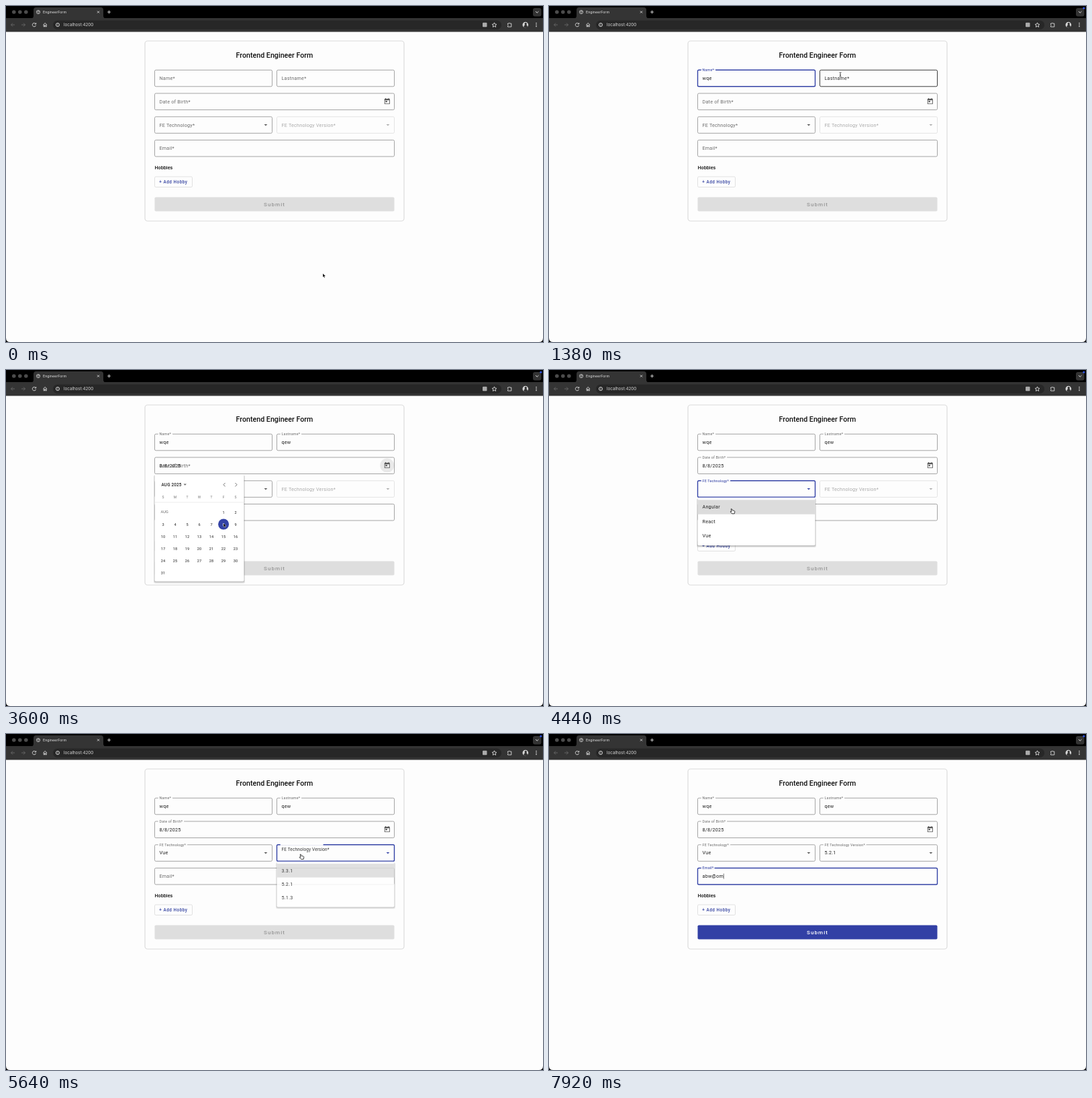
Write an HTML page that moves like this. It is 800 by 500 pixels and loops after 8000 ms.

```html
<!DOCTYPE html>
<html lang="en">
<head>
<meta charset="utf-8">
<title>Engineer form</title>
<style>
html, body { margin: 0; width: 100%; height: 100%; overflow: hidden; background: #000; }
svg { display: block; width: 800px; height: 500px; font-family: Roboto, sans-serif; }
.ui { font-family: Inter, sans-serif; }
</style>
</head>
<body>
<svg viewBox="0 0 800 500">
  <rect width="800" height="500"/>
  <g id="browser">
    <path d="M37 18.5q4 0 4-4V6q0-4 4-4h96q4 0 4 4v8.500q0 4 4 4z" fill="#343434"/>
    <rect y="18" width="800" height="21" fill="#343434"/>
    <rect x="70" y="21.500" width="668" height="13.500" rx="6.750" fill="#272727"/>
    <g fill="#4c4c4c"><circle cx="11.800" cy="9" r="2.800"/><circle cx="20.800" cy="9" r="2.800"/><circle cx="29.800" cy="9" r="2.800"/></g>
    <circle cx="48" cy="9" r="2.700" fill="none" stroke="#c8c8c8" stroke-width=".8"/>
    <path d="M46 8l2 .6-.5 1.500 1.500 1M48.500 6.600l-.3 1.400 2 .7" fill="none" stroke="#c8c8c8" stroke-width=".7"/>
    <g class="ui" fill="#e4e4e4">
      <text x="55" y="11" font-size="5.300">EngineerForm</text>
      <text x="86" y="30.300" font-size="6.250" fill="#d8d8d8">localhost:4200</text>
    </g>
    <g fill="none" stroke="#ddd" stroke-width=".9">
      <path d="M136 7.500l3 3m0-3l-3 3M151 9h5m-2.500-2.500v5"/>
      <path d="M13 28H7.500m2.500-2.500L7.500 28l2.500 2.500M23 28h5.500m-2.500-2.500l2.500 2.500-2.500 2.500" stroke="#686868"/>
      <path d="M44.300 26.600a2.700 2.700 0 1 0 .3 2.200M44.700 25v2h-2"/>
      <path d="M55.500 28l2.700-2.600 2.700 2.600M56.200 27.500v3.300h1.300v-2h1.400v2h1.300v-3.300"/>
      <circle cx="77" cy="28" r="2.600"/><path d="M77 27.500v1.800M77 26.300v.6"/>
      <path d="M727.500 24.800l1 2.200 2.400.3-1.800 1.600.5 2.400-2.100-1.200-2.100 1.200.5-2.400-1.800-1.600 2.400-.3z"/>
      <path d="M747.500 26h1.500q.8-2 1.600 0h2.200v5h-5.300v-1.600q1.500-.7 0-1.700z"/>
    </g>
    <rect x="710" y="24.800" width="6.500" height="6.500" rx="1" fill="#aaa"/>
    <circle cx="773.800" cy="28" r="4.300" fill="#d8d8d8"/>
    <path d="M771.300 31.500q0-3 2-3.500a1.700 1.700 0 1 1 1.800 0q2 .6 1.800 3.400-2.800 1.800-5.600.1z" fill="#333"/>
    <g fill="#ddd"><circle cx="790" cy="25.600" r=".8"/><circle cx="790" cy="28" r=".8"/><circle cx="790" cy="30.400" r=".8"/></g>
    <rect x="785" y="3" width="12.500" height="12.500" rx="3" fill="#333"/>
    <path d="M789 8l2.200 2.200L793.400 8" fill="none" stroke="#ddd"/>
  </g>
  <path d="M0 38.500h800V494q0 6-6 6H6q-6 0-6-6z" fill="#fdfdfd"/>
  <rect x="207" y="52" width="386" height="268" rx="4" fill="#fdfdfd" stroke="#dcdcdc" stroke-width="1.200"/>
  <text x="400" y="77" font-size="10.700" font-weight="500" text-anchor="middle" fill="#111">Frontend Engineer Form</text>
  <text x="221.500" y="242.800" font-size="7.200" font-weight="500" fill="#111">Hobbies</text>
  <rect x="221.500" y="254" width="56" height="15.500" rx="1.800" fill="none" stroke="#dedede" stroke-width=".9"/>
  <text x="228.300" y="264" font-size="6.300" font-weight="500" letter-spacing=".55" fill="#303f9f">+ Add Hobby</text>
  <g id="live"></g>
</svg>
<script>
const LOOP = 8000, STEP = 60;
const BLUE = '#3443a6', BG = '#fdfdfd';
const live = document.getElementById('live');

const clamp = v => Math.max(0, Math.min(1, v));
const ramp = (t, start, length) => clamp((t - start) / length);
const easeOut = p => 1 - (1 - p) ** 2;
const smooth = p => p * p * (3 - 2 * p);
const mix = (a, b, p) => a + (b - a) * p;
const typed = (text, times, t) => text.slice(0, times.filter(at => t >= at).length);

function label(x, y, content, { size = 7.2, fill = '#222', extra = '' } = {}) {
  return `<text x="${x}" y="${y}" font-size="${size}" letter-spacing="${size * .03125}" fill="${fill}" ${extra}>${content}</text>`;
}

// Each move: start, end, from, to. The pointer rests in between.
const moves = [
  [0, 420, 472, 400, 302, 108],
  [1020, 1380, 318, 109, 434, 102],
  [1980, 2400, 436, 108, 566.5, 139],
  [2760, 3360, 566.5, 139, 324, 230],
  [3600, 3960, 324, 230, 285, 181],
  [4200, 4440, 285, 181, 273.5, 210],
  [4440, 4740, 273.5, 210, 262, 247],
  [4920, 5400, 262, 247, 440.5, 182.5],
  [5640, 5940, 440.5, 182.5, 441, 225],
  [6180, 6480, 441, 225, 345, 212]
];
const hiddenSpans = [[780, 1020], [1680, 1980], [6720, LOOP]];

function pointerAt(t) {
  const [start, end, x0, y0, x1, y1] = moves.filter(m => t >= m[0]).pop();
  const p = smooth(ramp(t, start, end - start));
  return {
    x: mix(x0, x1, p), y: mix(y0, y1, p),
    hidden: hiddenSpans.some(([a, b]) => t >= a && t < b)
  };
}

const fields = [
  { x: 221.5, y: 95.3, w: 175, name: 'Name*', notch: 18, float: 420, focus: [420, 1560],
    text: 'wqe', keys: [780, 840, 960], caret: [540, 1020] },
  { x: 403.5, y: 95.3, w: 175, name: 'Lastname*', notch: 28, float: 1560, focus: [1560, 2640],
    text: 'qew', keys: [1680, 1740, 1860], caret: [1620, 1980] },
  { x: 221.5, y: 130, w: 357, name: 'Date of Birth*', notch: 35, float: 3600, focus: [0, 0],
    text: '8/8/2025', keys: Array(8).fill(3600) },
  { x: 221.5, y: 164.8, w: 175, name: 'FE Technology*', notch: 40, float: 4200, focus: [4200, 5580],
    text: 'Vue', keys: Array(3).fill(4920), select: true },
  { x: 403.5, y: 164.8, w: 175, name: 'FE Technology Version*', notch: 60.5, float: 5580, focus: [5580, 6660],
    text: '5.2.1', keys: Array(5).fill(6180), select: true, enabled: 4920 },
  { x: 221.5, y: 199.5, w: 357, name: 'Email*', notch: 16.5, float: 6660, focus: [6660, LOOP],
    text: 'abw@om', keys: [6780, 6840, 6960, 7380, 7800, 7920], caret: [6720, LOOP] }
];
const advance = { w: 5.6, q: 4.3, e: 4.05, a: 4.1, b: 4.25, '@': 6.7, o: 4.3, m: 6.5 };

const inside = (f, c) => c.x > f.x && c.x < f.x + f.w && c.y > f.y && c.y < f.y + 24.5;

function drawField(f, t, pointer, blocked) {
  const disabled = t < (f.enabled || 0);
  const focused = t >= f.focus[0] && t < f.focus[1];
  const tinted = t >= f.focus[0] + 100 && t < f.focus[1] + 60;
  const hover = !disabled && !blocked && !pointer.hidden && inside(f, pointer);
  const lift = ramp(t, f.float, 130);
  const border = disabled ? '#e2e2e2' : focused ? BLUE : hover ? '#333' : '#a0a0a0';
  const ink = disabled ? '#aaa' : tinted ? BLUE : hover || focused ? '#333' : '#6c6c6c';
  const middle = f.y + 12.2, left = f.x + 7;
  let out = `<rect x="${f.x}" y="${f.y}" width="${f.w}" height="24.5" rx="1.800" fill="none" stroke="${border}" stroke-width="${focused ? 1.4 : .95}"/>`;
  if (lift > 0) out += `<rect x="${left - 1.8}" y="${f.y - 1}" width="${f.notch + 3.4}" height="2" fill="${BG}"/>`;
  out += label(left, mix(middle + 2.6, f.y + 1.9, lift), f.name, { size: mix(7.2, 5.4, lift), fill: ink });

  const value = typed(f.text, f.keys, t);
  out += label(left, middle + 2.3, value);
  if (f.caret && t >= f.caret[0] && t < f.caret[1]) {
    const end = [...value].reduce((sum, ch) => sum + advance[ch], left);
    out += `<path d="M${end + .3} ${middle - 4}v8" stroke="#222" stroke-width=".6"/>`;
  }
  if (f.select) {
    out += `<path d="M${f.x + f.w - 12} ${middle - 1.1}h4.800l-2.400 2.400z" fill="${disabled ? '#aaa' : focused ? BLUE : '#555'}"/>`;
  }
  return out;
}

function drawDateButton(t) {
  const shade = t < 2340 ? 0 : t < 2640 ? .03 : t < 2880 ? .2 : t < 4200 ? .08 : 0;
  return `<circle cx="567.800" cy="142" r="10.600" opacity="${shade}"/>
    <path transform="translate(562.400 136.600) scale(.45)" fill="#555" d="M19 3h-1V1h-2v2H8V1H6v2H5c-1.100 0-2 .9-2 2v14c0 1.100.9 2 2 2h14c1.100 0 2-.9 2-2V5c0-1.100-.9-2-2-2zm0 16H5V8h14zM7 10h5v5H7z"/>`;
}

function drawSubmit(t) {
  const p = ramp(t, 7800, 120);
  const blend = (a, b) => `rgb(${a.map((v, i) => Math.round(mix(v, b[i], p)))})`;
  return `<rect x="221.500" y="284.500" width="357" height="21" rx="1.800" fill="${blend([222, 222, 222], [50, 64, 165])}"/>
    <text x="384" y="297.900" font-size="8.100" font-weight="500" letter-spacing="1.050" fill="${blend([152, 152, 152], [255, 255, 255])}">Submit</text>`;
}

// Overlay that grows from its top edge and fades away on close.
function overlay(t, open, close, x, y, w, h, content) {
  if (t <= open || t >= close + 100) return '';
  const p = easeOut(ramp(t, open, 120));
  const opacity = Math.min(1, p * 1.15) * (1 - ramp(t, close, 100));
  const shadow = [3, 2, 1].map(d =>
    `<rect x="${-d / 2}" y="${d / 2}" width="${w + d}" height="${h + d / 2}" rx="2.500" opacity=".09"/>`).join('');
  return `<g opacity="${opacity}" transform="translate(${x} ${y}) scale(1 ${mix(.8, 1, p)})">${shadow}
    <rect width="${w}" height="${h}" rx="1.800" fill="#fff"/>${content}</g>`;
}

function drawMenu(t, open, close, x, options, pointer) {
  const row = 21.4, pad = 3.5;
  const pointed = Math.floor((pointer.y - 189.8 - pad) / row);
  const active = pointed >= 0 && pointed < options.length ? pointed : 0;
  const content = `<rect y="${pad + active * row}" width="175" height="${row}" fill="#dcdcdc"/>` +
    options.map((o, i) => label(7, pad + (i + .5) * row + 2.4, o)).join('');
  return overlay(t, open, close, x, 189.8, 175, 71.2, content);
}

function drawCalendar(t, pointer) {
  const cell = 18, column = i => 3.6 + (i + .5) * cell;
  const small = { size: 5.6, extra: 'text-anchor="middle"' };
  let out = label(10, 18, 'AUG 2025', { size: 6.3, extra: 'font-weight="500"' }) +
    '<path d="M43 14.600h4.400l-2.200 2.200z" fill="#666"/>' +
    '<path d="M105 13l-2.500 2.700 2.500 2.700M120 13l2.500 2.700-2.500 2.700" fill="none" stroke="#666" stroke-width=".9"/>' +
    '<path d="M0 42h133" stroke="#e0e0e0" stroke-width=".6"/>' +
    [...'SMTWTFS'].map((d, i) => label(column(i), 36, d, { ...small, size: 5, fill: '#777' })).join('') +
    label(9, 58.2, 'AUG', { size: 5.6, fill: '#666' });
  for (let day = 1; day <= 31; day++) {
    const slot = day + 4, cx = column(slot % 7), cy = 56.5 + Math.floor(slot / 7) * cell;
    const near = Math.abs(pointer.x - 221.5 - cx) < 9 && Math.abs(pointer.y - 155 - cy) < 9;
    if (near) out += `<circle cx="${cx}" cy="${cy}" r="8" fill="${t >= 3600 ? BLUE : '#c9cdea'}"/>`;
    out += label(cx, cy + 2, day, { ...small, fill: near && t >= 3600 ? '#fff' : '#222' });
  }
  return overlay(t, 2640, 3600, 221.5, 155, 133, 159.5, out);
}

function drawPointer(c, t, overlaid) {
  if (c.hidden) return '';
  const target = fields.find(f => inside(f, c));
  const hand = overlaid || (target && (target.select || c.x > 557 && target.y === 130));
  const at = `transform="translate(${c.x} ${c.y})"`;
  if (hand) {
    return `<path ${at} d="M-2.300-3.200q.8-.9 1.400.2l.7 1.900 2.500.5q1.300.4 1 1.800l-.6 2.600h-3.600l-2.300-2.600q-.3-1.100 1-.6l.7.4z" fill="#fff" stroke="#111" stroke-width=".8"/>`;
  }
  if (target) {
    return `<path ${at} d="M-1.500-3.300q1.300 0 1.500.8.200-.8 1.500-.8M0-2.500v5M-1.500 3.300q1.300 0 1.500-.8.200.8 1.500.8M-.8.8h1.600" fill="none" stroke="#222" stroke-width=".8"/>`;
  }
  return `<path ${at} d="M0-2v5.600l1.300-1.200.9 2 1-.4-.9-2h1.800z" fill="#000" stroke="#fff" stroke-width=".35"/>`;
}

function render(t) {
  const pointer = pointerAt(t);
  const open = [[2700, 3600], [4200, 4920], [5580, 6180]].some(([a, b]) => t >= a && t < b);
  live.innerHTML =
    fields.map(f => drawField(f, t, pointer, open)).join('') +
    drawDateButton(t) + drawSubmit(t) +
    drawCalendar(t, pointer) +
    drawMenu(t, 4200, 4920, 221.5, ['Angular', 'React', 'Vue'], pointer) +
    drawMenu(t, 5580, 6180, 403.5, ['3.3.1', '5.2.1', '5.1.3'], pointer) +
    (t >= STEP ? '<circle cx="796.800" cy="3.200" r="1.500" fill="#3157e8"/>' : '') +
    drawPointer(pointer, t, open && pointer.y > 190);
}

function tick() {
  const t = performance.now() % LOOP;
  render(Math.floor(t / STEP) * STEP);
  requestAnimationFrame(tick);
}
tick();
</script>
</body>
</html>
```
